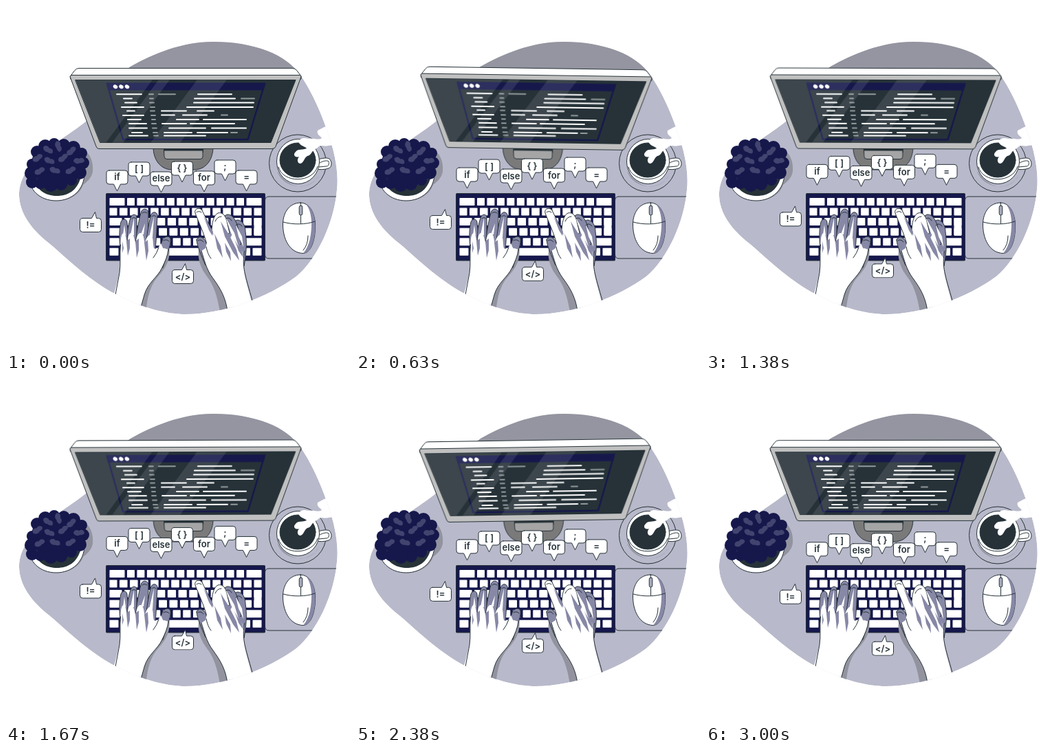
Animation of 500 by 500 pixels, one loop 3.04 s. Source, as an HTML page:

```html
<!DOCTYPE html>
<html lang="en">
<head>
<meta charset="utf-8">
<title>Coding desk</title>
<style>
html, body { margin: 0; width: 100%; height: 100%; overflow: hidden; background: #fff; }
svg { display: block; width: 100vw; height: 100vh; }
.ink { stroke: #263238; stroke-width: 1; stroke-linejoin: round; stroke-linecap: round; }
.line { fill: none; }
.white { fill: #fff; }
.navy { fill: #16184c; }
.dark { fill: #263238; }
.shade { fill: #8788a6; }
.shadow { fill: #92939f; }
.code { stroke: #fff; stroke-width: 1.9; stroke-linecap: round; }
.code .dim { stroke: #929a9c; }
text { font: 600 13px Inter, "Open Sans", sans-serif; text-anchor: middle; fill: #263238; }
#monitor { transform-origin: 261px 164px; animation: sway 3040ms linear infinite; }
#bubbles { animation: hover 3040ms linear infinite; }
@keyframes sway {
  0%, 100% { transform: rotate(0deg); }
  25% { transform: rotate(1deg); }
  75% { transform: rotate(-1deg); }
}
@keyframes hover {
  0%, 100% { transform: translateY(0); }
  50% { transform: translateY(-9.5px); }
}
</style>
</head>
<body>
<svg viewBox="0 0 500 500">
  <defs>
    <path id="blob" d="M301 52C255 52 213 70 181 88C160 102 137 150 117 167C95 186 47 210 28 243C21 255 19 265 19 275C20 302 37 325 64 346C92 370 125 402 160 419C200 440 235 448 261 448C315 448 380 424 422 393C452 368 477 315 481 267C484 240 477 210 468 185C460 160 445 125 429 102C408 70 360 52 301 52Z"/>
    <clipPath id="desk"><use href="#blob"/></clipPath>
    <clipPath id="screen"><path d="M101 107.500H421L385 198.500H137Z"/></clipPath>
  </defs>

  <g clip-path="url(#desk)">
    <use href="#blob" fill="#b8b9ca"/>
    <path fill="#9495a0" d="M0 0H500V96H0Z"/>

    <!-- mouse and pad -->
    <path class="ink line" d="M500 277H382Q376.500 277 376.500 283V361Q376.500 367 382 367H500"/>
    <path class="ink white" d="M428 286C442 286 449 302 449.500 318C450 338 444 359 432 359.500C412 359 402 338 402.500 316C403 300 412 286 428 286Z"/>
    <path class="shade" d="M436 288C446 294 449 306 449.500 318C450 338 444 359 432 359.500C442 348 444 330 444 316C444 304 441 294 436 288Z"/>
    <path class="ink line" d="M403 314C416 318 437 318 449 313M428.500 286V291M428.500 304V316M439 334Q439 347 432 355"/>
    <rect class="ink" x="426.200" y="290" width="4.600" height="14" rx="2.300" fill="#a9aabd"/>

    <!-- coffee -->
    <circle class="ink line" cx="424" cy="228.500" r="41.500"/>
    <path class="shadow" d="M394 240C402 264 440 272 455 246L448 255C432 268 410 264 394 240Z"/>
    <path class="ink white" d="M451 224C459 221 466 220 470 222C474 226 474 234 469 236C463 238 456 238 450 237Z"/>
    <path class="ink line" d="M456 228C461 225 467 224 469 226C470 230 469 233 465 233L455 234"/>
    <ellipse class="ink white" cx="424.500" cy="226" rx="31" ry="32.500"/>
    <path class="ink line" d="M396 234C402 258 446 258 453 233"/>
    <ellipse class="ink dark" cx="424" cy="224" rx="26" ry="25"/>
    <path fill="#fff" d="M500 172L470 175C463 174 458 179 453 181C451 187 457 189 459 192C453 196 447 191 440 193C431 190 424 194 426 199C429 204 435 204 437 207C431 210 424 207 421 212C416 217 421 221 426 219C422 224 424 229 428 229C433 228 433 221 438 218C444 217 444 211 449 208C455 206 453 203 460 203C467 205 470 201 476 203L500 204Z"/>
  </g>

  <!-- plant -->
  <path class="shadow" d="M98 207C119 203 128 224 126 241C124 251 117 256 112 260C107 275 92 281 82 282Z"/>
  <path class="ink white" d="M33 244C32 268 50 283 73 283C96 283 114 267 114 243Z"/>
  <path class="dark" d="M40 252C46 270 60 276 74 276C90 276 103 268 108 251Z"/>
  <g id="leaves" class="navy"></g>

  <!-- monitor -->
  <g id="monitor">
    <path class="ink" fill="#7a7a7a" d="M214 205C214 223 224 238 242 238H273C291 238 301 223 301 205Z"/>
    <path class="dark" d="M229 206H287V213H229Z"/>
    <path class="ink" fill="#a5a5a5" d="M230 210H286V219Q286 222.500 282 222.500H234Q230 222.500 230 219Z"/>
    <path class="ink white" d="M93.500 102L100 93.500Q102 90.500 106 90.500H416Q420 90.500 422.500 93.500L429 102V106H94Z"/>
    <path class="ink" fill="#c0c0c0" d="M96 100.500H426Q429.500 100.500 428.500 104L392 204Q391 207.500 387 207.500H135Q132 207.500 131 204L93.500 104Q92.500 100.500 96 100.500Z"/>
    <path class="ink dark" d="M101 107.500H421L385 198.500H137Z"/>
    <path d="M147 113H376L351.500 194H170Z" fill="none" stroke="#16184c" stroke-width="2.400"/>
    <path class="navy" d="M145.500 111.800H377.500L374.500 122.500H148.500Z"/>
    <g class="white">
      <ellipse cx="159" cy="117.300" rx="3.400" ry="2.700" transform="rotate(30 159 117.300)"/>
      <ellipse cx="167.500" cy="117.300" rx="3.400" ry="2.700" transform="rotate(30 167.500 117.300)"/>
      <ellipse cx="176" cy="117.300" rx="3.400" ry="2.700" transform="rotate(30 176 117.300)"/>
    </g>
    <g class="code line">
      <path d="M161 128.300H197M171 134.500H183M173 140.500H190M168 147H200M176 152.500H187M170 159H200M177 165H196M179 171H204M179 177.500H205M183 184H198M179 188.500H206"/>
      <path d="M279 128.300H328M274 134.500H333M273 140.500H360M263 147H359M226 152.500H262M278 152.500H302M226 158.500H245M257 158.500H292M248 165H280M287 165H349M227 171H262M268 171H332M237 177.500H290M299 177.500H349M230 184H270M278 184H322M230 188.500H290"/>
      <path class="dim" d="M208 128.300H214M222 128.300H246M209 134.500H214M342 134.500H361M209 140.500H215M210 147H216M210 152.500H216M313 158.500H322M211 159H217M212 165H217M212 171H218M213 177.500H219M327 184H336M214 184H220M215 188.500H221"/>
    </g>
    <g clip-path="url(#screen)" fill="#fff" opacity=".1">
      <path d="M100 107H213L145 199H100Z"/>
      <path d="M222 107H238L170 199H154Z"/>
      <path d="M278 107H321L253 199H210Z"/>
    </g>
  </g>

  <!-- keyboard -->
  <rect class="ink navy" x="145.500" y="272.500" width="231" height="97.500" rx="1"/>
  <g id="keys" class="white"></g>

  <!-- arm shadows -->
  <g clip-path="url(#desk)" class="shadow">
    <path d="M237 350C240 368 232 381 222 392C210 405 205 422 203 450H190L202 400Z"/>
    <path d="M281 350C277 364 282 380 292 393C302 406 307 420 312 450H335L310 395Z"/>
  </g>

  <g id="bubbles"></g>

  <!-- hands -->
  <g clip-path="url(#desk)">
    <g class="ink shade">
      <path d="M166 350C164 335 165 322 167 314C169 308 176 309 176 315L180 350Z"/>
      <path d="M176 345C176 325 179 312 182 306C185 301 191 303 190 309L190 348Z"/>
      <path d="M188 345C191 322 194 306 197 298C200 293 207 295 207 301C207 315 206 330 206 348Z"/>
      <path d="M203 347C206 325 208 312 211 303C214 297 221 300 220 306C219 320 219 335 217 354Z"/>
      <path d="M214 372C222 362 224 350 227 341C229 335 237 333 239 338C240 345 236 355 233 365L228 380Z"/>
    </g>
    <path class="white" d="M150 445L165 388C167 375 165 360 166.500 344C167 336 168 331 171 330C175 331 174 341 177 345C177 337 178 330 182 330C187 332 186 341 189 345C189 337 192 329 196 330C201 332 200 340 202 346C203 339 206 332 210 333C215 335 213 345 215 352C219 355 222 351 225 345C227 348 228 354 230 352L236 354C235 363 231 372 227 380C220 395 206 402 201 420L194 445Z"/>
    <path class="white" d="M172 318L174 333L170 333ZM186 308L186 333L181 333ZM215 306L213 336L208 336ZM202 316L200 332L196 332Z"/>
    <path class="ink line" d="M158 425L165 388C167 375 165 360 166.500 347M236 354C235 363 231 372 227 380C220 395 206 402 201 420L194 445M222 351Q219 360 214 366"/>
    <path class="shade" d="M175 342L180 338L180 352L177 363ZM188 342L193 338L193 355L190 366ZM201 344L206 340L207 356L204 370ZM169 342L171 352L169 359Z"/>
    <path class="ink line" d="M198 301Q201 298 205 301M212 306Q215 303 218 306M183 309Q186 306 189 309M229 341Q233 338 237 342"/>

    <g class="ink shade">
      <path d="M277 340C280 333 288 335 291 345L299 365L290 377C284 363 278 350 277 340Z"/>
      <path class="white" d="M293 350C288 330 279 312 275 301C273 294 282 292 285 297L301 330Z"/>
      <path d="M326 332C327 320 331 311 337 311C344 312 348 319 348 328C350 342 350 356 346 378L332 355Z"/>
      <path d="M313 330C312 313 316 304 322 303C329 303 333 310 336 318L342 346L325 352Z"/>
      <path class="white" d="M299 328C299 315 302 304 308 301C315 299 319 305 321 313L325 330L308 340Z"/>
    </g>
    <path class="white" d="M290 352L296 326L302 332L305 320L312 331L316 318L326 337L330 330L338 352L343 356L346 368C343 385 350 402 361 445H322C320 425 312 411 301 396C291 383 288 368 284 356Z"/>
    <path class="ink line" d="M347 356C342 378 348 392 358 428M284 356C288 368 291 383 301 396C312 411 320 425 322 445M291 350Q293 361 298 367"/>
    <path class="shade" d="M312 313L324 332L335 354L339 370L330 358L318 335ZM329 330L341 348L345 366L338 356ZM303 331L312 349L315 366L307 352ZM318 344L326 358L327 371L320 357ZM287 305L301 328L300 334L295 326Z"/>
    <path class="white" d="M319 307L332 330L338 350L327 330ZM334 318L343 335L345 350L338 335Z"/>
    <path class="ink line" d="M277 300Q280 297 284 300M304 313Q307 306 313 306M320 309Q324 306 328 312M334 319Q338 314 343 320M279 341Q283 338 287 343"/>
  </g>
</svg>
<script>
const NS = "http://www.w3.org/2000/svg";

function add(parent, tag, attrs, label = "") {
  const node = document.createElementNS(NS, tag);
  for (const name in attrs) node.setAttribute(name, attrs[name]);
  node.textContent = label;
  document.getElementById(parent).append(node);
}

function drawKeys() {
  const left = 150.5, right = 371.5, gap = 3.5, pitch = 14.55;
  const key = (x, y, width, height = 11) => add("keys", "rect", { x, y, width, height, rx: 0.8 });
  // first width, last width, keys between
  const rows = [[22, 22, 12], [11, 11, 13], [18, 11, 12], [22, 11, 12], [15, 26, 12]];
  rows.forEach(([first, last, count], row) => {
    const y = 279 + row * pitch;
    const start = left + first + gap;
    const step = (right - last - start) / count;
    key(left, y, first);
    for (let i = 0; i < count; i++) key(start + i * step, y, step - gap);
    key(right - last, y, last);
  });
  key(360.5, 308.1, 11, 25.5);
  const y = 279 + 5 * pitch;
  for (let i = 0; i < 4; i++) {
    key(left + i * 16.5, y, 13);
    key(right - 13 - i * 16.5, y, 13);
  }
  key(217, y, 88);
}

function drawLeaves() {
  add("leaves", "ellipse", { cx: 74, cy: 231, rx: 38, ry: 31 });
  const clumps = [[38, 230], [45, 212], [57, 204], [70, 200], [84, 202], [98, 206], [110, 214],
    [112, 228], [107, 242], [95, 253], [80, 259], [65, 260], [50, 258], [38, 256], [37, 243]];
  clumps.forEach(([cx, cy], i) => add("leaves", "circle", { cx, cy, r: 8 + i % 3 }));
  const spots = [[61, 209, 40], [76, 204, 80], [95, 211, -35], [46, 221, -25], [63, 225, 30],
    [83, 221, -30], [106, 225, 5], [49, 240, -20], [71, 239, 25], [94, 239, -20]];
  spots.forEach(([x, y, turn]) => add("leaves", "path", {
    d: "M-8 1C-7-5-2-4 0-3C3-6 8-4 8 0C5 4 2 2 0 4C-3 5-6 4-8 1Z",
    fill: "#42446f", transform: `translate(${x} ${y}) rotate(${turn})`
  }));
}

function drawBubble(label, x, y, tail) {
  const top = tail ? `H${x + tail - 5}L${x + tail} ${y - 19}L${x + tail + 2} ${y - 10}` : "";
  const bottom = tail ? "" : `H${x + 5}L${x} ${y + 20}L${x - 5} ${y + 10}`;
  const d = `M${x - 11.5} ${y - 10}${top}H${x + 11.5}q4 0 4 4v12q0 4-4 4${bottom}H${x - 11.5}q-4 0-4-4v-12q0-4 4-4Z`;
  add("bubbles", "path", { class: "ink white", d });
  add("bubbles", "text", { x, y: y + 4.5 }, label);
}

drawKeys();
drawLeaves();
[["if", 161.5, 249], ["[ ]", 193.5, 237], ["else", 225.5, 251], ["{ }", 256, 236],
  ["for", 288, 250], [";", 318.5, 234], ["=", 349.5, 249],
  ["!=", 123, 318.5, 6.5], ["</>", 257, 393.5, 3.5]].forEach(args => drawBubble(...args));
</script>
</body>
</html>
```
